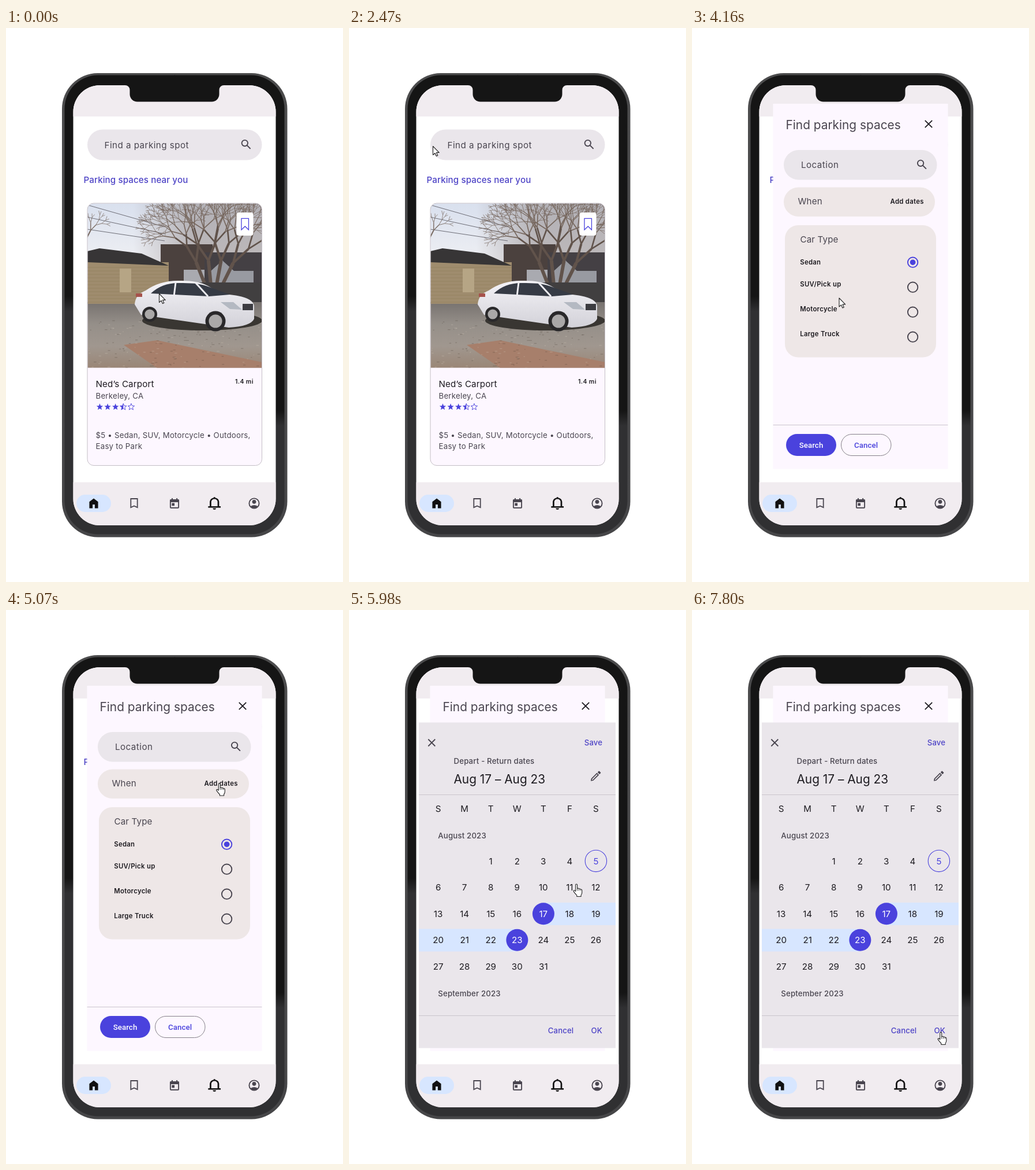
Animation, 584 px wide and 958 px high, one loop 8 s. Source, as an HTML page with a canvas:

```html
<!DOCTYPE html>
<html lang="en">
<head>
<meta charset="utf-8">
<title>Parking finder</title>
<style>
  html, body { margin: 0; width: 100%; height: 100%; overflow: hidden; background: #fff; }
  canvas { display: block; width: 584px; height: 958px; }
</style>
</head>
<body>
<canvas id="stage"></canvas>
<script>
const W = 584, H = 958, LOOP = 8000, FRAME = 130;
const MODAL_AT = 2730, HAND_AT = 5070, CALENDAR_AT = 5200;
const canvas = document.getElementById('stage');
const dpr = window.devicePixelRatio || 1;
canvas.width = W * dpr;
canvas.height = H * dpr;
const ctx = canvas.getContext('2d');

const INK = '#1d1b20', SOFT = '#49454f', PRIMARY = '#4a42dd', LINK = '#4d43c6';
const SURFACE = '#fdf7ff', FIELD = '#eae6eb', WARM = '#eee7e7', BAR = '#f1ecf0';
const RANGE = '#d7e6ff', LINE = '#cac5cc', BEZEL = '#151515', METAL = '#303032';

// The app is drawn a little smaller than its design size
const SCALE = .947;
const BODY = 16 * SCALE, SMALL = 14 * SCALE, LABEL = 12 * SCALE, TITLE = 22 * SCALE;

const ARROW = new Path2D('M.5.5V15.5L4 12.3 6.4 17.6 8.8 16.5 6.5 11.4H11.2Z');
const HAND = new Path2D('M4.3 13V2.2Q4.3.6 5.7.6T7.2 2.2V8.2Q9.4 7 10.2 8.8 12.2 8 12.9 9.7 15.3 9.2 15.3 11.6V15Q15.3 18 13.6 19.6V22H6.4V20Q4 17.6.9 13.4.2 11 2.4 11.4Z');
const HOUSE = new Path2D('M-8 9V-3L0-9 8-3V9H2V2H-2V9Z');
const BELL = new Path2D('M-5 6V-2A5 5 0 0 1 5-2V6M-8 6H8M0-9V-6');
const PENCIL = new Path2D('M-11.5 0L-9-1.8H4.6V1.8H-9Z');

function paint(fill, stroke, lw = 1, path) {
  const args = path ? [path] : [];
  if (fill) { ctx.fillStyle = fill; ctx.fill(...args); }
  if (stroke) { ctx.strokeStyle = stroke; ctx.lineWidth = lw; ctx.stroke(...args); }
}

function box(x, y, w, h, r, fill, stroke, lw) {
  ctx.beginPath();
  ctx.roundRect(x, y, w, h, r);
  paint(fill, stroke, lw);
}

function rect(x, y, w, h, fill) {
  ctx.fillStyle = fill;
  ctx.fillRect(x, y, w, h);
}

function disc(x, y, r, fill, stroke, lw, ry = r) {
  ctx.beginPath();
  ctx.ellipse(x, y, r, ry, 0, 0, 7);
  paint(fill, stroke, lw);
}

function poly(points, fill, stroke, lw) {
  ctx.beginPath();
  for (const [x, y] of points) ctx.lineTo(x, y);
  ctx.closePath();
  paint(fill, stroke, lw);
}

function line(color, lw, x1, y1, x2, y2) {
  ctx.beginPath();
  ctx.moveTo(x1, y1);
  ctx.lineTo(x2, y2);
  paint(null, color, lw);
}

function text(str, x, y, size, { color = INK, weight = 400, gap = 0, align = 'left', face = 'Inter' } = {}) {
  ctx.font = `${weight} ${size}px ${face}, sans-serif`;
  ctx.letterSpacing = gap + 'px';
  ctx.textAlign = align;
  ctx.fillStyle = color;
  ctx.fillText(str, x, y);
}

function at(x, y, drawing, { sx = 1, sy = sx, turn = 0 } = {}) {
  ctx.save();
  ctx.translate(x, y);
  ctx.rotate(turn);
  ctx.scale(sx, sy);
  drawing();
  ctx.restore();
}

function fade(x1, y1, x2, y2, ...colors) {
  const g = ctx.createLinearGradient(x1, y1, x2, y2);
  colors.forEach((c, i) => g.addColorStop(i / (colors.length - 1), c));
  return g;
}

function seeded(seed) {
  return () => (seed = (seed * 16807) % 2147483647) / 2147483647;
}

function cross(x, y, r, color) {
  for (const s of [-r, r]) line(color, 1.8, x - r, y - s, x + r, y + s);
}

function lens(x, y) {
  disc(x - 2.4, y - 2.4, 5.2, null, SOFT, 1.9);
  line(SOFT, 2, x + 1.4, y + 1.4, x + 7.4, y + 7.4);
}

function ribbon(x, y, w, h, dip, color, lw) {
  const r = w / 2, b = h / 2;
  poly([[x - r, y - b], [x + r, y - b], [x + r, y + b], [x, y + b - dip], [x - r, y + b]], null, color, lw);
}

function phone() {
  box(97, 78, 390.5, 802.5, 62, fade(0, 78, 0, 880, '#4c4c4d', '#464648'));
  ctx.save();
  ctx.beginPath();
  ctx.roundRect(101.5, 81.5, 381, 794, 58);
  ctx.clip();
  // The dark glass reaches further down on the right side
  rect(97, 78, 196, 803, fade(0, 464, 0, 490, BEZEL, METAL));
  rect(292, 78, 196, 803, fade(0, 662, 0, 688, BEZEL, METAL));
  ctx.restore();
}

function notch() {
  const l = 214.5, r = 369.5, top = 99, bottom = 127.5;
  ctx.beginPath();
  ctx.moveTo(l - 9, top);
  ctx.arcTo(l, top, l, bottom, 8);
  ctx.arcTo(l, bottom, r, bottom, 13);
  ctx.arcTo(r, bottom, r, top, 13);
  ctx.arcTo(r, top, r + 9, top, 8);
  ctx.lineTo(r + 9, top);
  paint(BEZEL);
}

function nav() {
  const y = 822;
  rect(116, 785.5, 352, 75, BAR);
  box(122, y - 15, 60, 30, 15, RANGE);
  at(152, y, () => paint('#111', null, 0, HOUSE), { sx: SCALE });
  ribbon(222, y - .5, 11.4, 15, 2.6, SOFT, 1.8);

  box(284.9, 816, 14.2, 13.8, 1, null, SOFT, 1.9);
  rect(284.5, 815.5, 15, 4.5, SOFT);
  for (const x of [287, 295.2]) rect(x, 813, 1.9, 3, SOFT);
  rect(287.3, 821.5, 4.7, 4.7, SOFT);

  at(361.2, y - .6, () => {
    paint(null, '#111', 2, BELL);
    ctx.beginPath();
    ctx.arc(0, 8, 2, 0, Math.PI);
    paint('#111');
  }, { sx: 1.36, sy: 1.14 });

  ctx.save();
  disc(430, y, 8.6, null, SOFT, 1.9);
  ctx.clip();
  disc(430, y - 2.7, 3.4, SOFT);
  disc(430, y + 13.5, 10.4, SOFT);
  ctx.restore();
}

function branch(rand, x, y, angle, len, w) {
  const x2 = x + Math.cos(angle) * len, y2 = y + Math.sin(angle) * len;
  line(w > 2 ? '#61534b' : '#77685f', w, x, y, x2, y2);
  if (len < 8) return;
  for (const side of [-1, 1])
    branch(rand, x2, y2, angle + side * (.15 + rand() * .4), len * (.7 + rand() * .16), Math.max(.7, w * .66));
}

function car() {
  disc(340, 506, 104, '#393632', null, 0, 17);
  const shell = new Path2D('M223 478Q224 461 242 454 266 437 298 437 332 436 350 446L374 460Q430 463 430 482V503Q424 516 386 518L234 496Z');
  paint(fade(0, 437, 0, 518, '#f4f3f7', '#d2d1d8'), null, 0, shell);
  const glass = new Path2D('M251 459Q270 441 298 441 334 440 350 447L388 461 352 464Z');
  paint('#363b45', null, 0, glass);
  for (const [x, lean] of [[294, 3], [328, -22]]) line('#edecf1', 3, x, 440, x - lean, 464);
  poly([[372, 474], [394, 474], [409, 487], [388, 486]], '#b4b9c2');
  rect(410, 477, 18, 11, '#3c3c41');
  rect(225, 459, 11, 6, '#a6524c');
  for (const [x, y, r] of [[249, 495, 13], [363, 507, 17.5]]) {
    disc(x, y, r, '#29282a');
    disc(x, y, r * .66, '#aaa8a8');
  }
}

// Flat stand-in for the photograph of a driveway
function photo() {
  const rand = seeded(71);
  ctx.save();
  ctx.beginPath();
  ctx.roundRect(141.5, 303.5, 301.5, 284, [10, 10, 0, 0]);
  ctx.clip();
  rect(141, 303, 303, 170, fade(0, 303, 0, 400, '#d9e0ee', '#eeeff3'));
  rect(220, 303, 224, 130, fade(220, 0, 320, 0, 'rgba(140,130,128,0)', 'rgba(140,130,128,.5)'));
  for (let i = 0; i < 3; i++) line('#6d6d76', 1, 141, 306 + i * 21, 275, 344 + i * 12);

  rect(268, 374, 90, 70, '#4b413e');
  rect(344, 388, 100, 62, '#444044');
  rect(308, 418, 36, 22, '#a9aab0');
  rect(354, 420, 75, 30, '#989aa1');
  poly([[354, 421], [375, 402], [396, 421]], '#989aa1');
  for (let k = 0; k < 4; k++) branch(rand, 345 + k * 10, 444, -1.95 + k * .28, 42, 6);
  branch(rand, 139, 365, -1.1, 17, 2);

  rect(270, 440, 174, 44, '#413f40');
  rect(141, 474, 303, 114, fade(0, 474, 0, 588, '#77726f', '#958f89', '#a0978f', '#9a8676'));
  rect(141, 405, 141, 72, '#9f8c6e');
  for (let y = 414; y < 476; y += 6) line('#94825f', .8, 141, y, 282, y);
  rect(197, 416, 20, 41, '#b6a585');
  poly([[141, 386], [162, 381], [235, 390], [282, 411], [141, 405]], '#373536');
  poly([[204, 548], [262, 540], [444, 578], [444, 588], [262, 588]], '#a77f6b');
  for (let i = 0; i < 170; i++)
    rect(141 + rand() * 302, 505 + rand() * 82, 1 + rand() * 4, 1.2,
      rand() < .5 ? 'rgba(70,58,48,.28)' : 'rgba(215,205,190,.28)');
  car();
  ctx.restore();
}

function star(x, y, fill) {
  const points = Array.from({ length: 10 }, (_, i) => {
    const a = i * Math.PI / 5 - Math.PI / 2, r = i % 2 ? 2.6 : 6;
    return [x + r * Math.cos(a), y + r * Math.sin(a)];
  });
  ctx.save();
  if (fill < 1) {
    poly(points, null, PRIMARY, .9);
    ctx.beginPath();
    ctx.rect(x - 7, y - 7, 14 * fill, 14);
    ctx.clip();
  }
  poly(points, PRIMARY);
  ctx.restore();
}

function home() {
  box(141, 175.5, 302.5, 53, 26.5, FIELD);
  text('Find a parking spot', 170.5, 207.5, BODY, { color: SOFT, gap: .47 });
  lens(416.2, 201.5);
  text('Parking spaces near you', 134.5, 268, BODY, { color: LINK, weight: 500, gap: .1 });
}

function card() {
  box(141, 303, 302.5, 453.5, 11, SURFACE);
  photo();
  box(141, 303, 302.5, 453.5, 11, null, '#c4bfc6');
  box(399.5, 319, 29, 40, 4, '#fff');
  ribbon(414.2, 339.2, 12.5, 19.5, 6, PRIMARY, 1.3);

  text('Ned’s Carport', 155.5, 620.5, BODY, { gap: .14 });
  text('1.4 mi', 397, 614.5, 11 * SCALE, { weight: 600, gap: .4 });
  const note = { color: SOFT, gap: .237 };
  text('Berkeley, CA', 155.5, 640.5, SMALL, note);
  for (let i = 0; i < 5; i++) star(162.5 + i * 13.6, 655.3, Math.max(0, Math.min(1, 3.5 - i)));
  text('$5 • Sedan, SUV, Motorcycle • Outdoors,', 155.5, 709.3, SMALL, note);
  text('Easy to Park', 155.5, 728.3, SMALL, note);
}

function modal() {
  rect(140.5, 131, 303, 631.5, SURFACE);
  text('Find parking spaces', 162.5, 175.3, TITLE, { color: SOFT });
  cross(410, 166, 6.2, INK);

  box(159, 211, 265.5, 51.5, 25.7, FIELD);
  text('Location', 189, 242.3, BODY, { color: SOFT, gap: .47 });
  lens(398.5, 236.2);

  const label = { weight: 600, gap: .3 };
  box(159, 275.5, 262, 50.5, 25.2, WARM);
  text('When', 183.5, 305.3, BODY, { color: SOFT, gap: .2 });
  text('Add dates', 343.5, 304.3, LABEL, label);

  box(161, 341, 262, 228.5, 23, WARM);
  text('Car Type', 187.5, 371, BODY, { color: SOFT, gap: .14 });
  ['Sedan', 'SUV/Pick up', 'Motorcycle', 'Large Truck'].forEach((name, i) => {
    const y = 405.2 + i * 43, chosen = i === 0;
    text(name, 187.2, y + (chosen ? 4 : -1.5), LABEL, label);
    disc(382.6, y, 8.7, null, chosen ? PRIMARY : SOFT, 1.9);
    if (chosen) disc(382.6, y, 4.8, PRIMARY);
  });

  line(LINE, 1, 140.5, 686.5, 443.5, 686.5);
  const button = { weight: 500, gap: .1, align: 'center', face: 'Roboto' };
  box(163, 702, 87, 38, 19, PRIMARY);
  text('Search', 206.5, 725.5, SMALL, { ...button, color: '#fff' });
  box(258.5, 702.5, 86.5, 37, 18.5, null, '#858088');
  text('Cancel', 301.5, 725.5, SMALL, { ...button, color: PRIMARY });
}

function calendar(t) {
  const col = i => 154.6 + i * 45.55, row = i => 434.3 + i * 45.5;
  const action = { color: LINK, weight: 500, gap: .1, align: 'center' };
  const caption = { color: SOFT, weight: 500, gap: .15 };
  rect(121, 194.5, 341, 563, FIELD);
  cross(143.3, 229.5, 6, SOFT);
  text('Save', 423.5, 234.3, SMALL, action);
  text('Depart - Return dates', 181.5, 266.3, SMALL, caption);
  text('Aug 17 – Aug 23', 181.5, 300, TITLE);
  at(427.7, 287, () => {
    paint(null, SOFT, 1.8, PENCIL);
    box(7, -2.6, 3.9, 5.2, 1, SOFT);
  }, { sx: SCALE, turn: -Math.PI / 4 });
  line(LINE, 1, 121, 319.5, 462, 319.5);
  [...'SMTWTFS'].forEach((d, i) => text(d, col(i), 348.5, BODY, { align: 'center' }));
  text('August 2023', 154.3, 395.4, SMALL, caption);

  rect(col(4), 506, 462 - col(4), 39, RANGE);
  rect(121, 551.5, col(3) - 121, 39, RANGE);
  for (let day = 1; day <= 31; day++) {
    const x = col((day + 1) % 7), y = row(Math.floor((day + 1) / 7));
    const picked = day === 17 || day === 23, today = day === 5;
    if (picked) disc(x + .1, y, 19, PRIMARY);
    if (today) disc(x, y - .4, 18.7, null, PRIMARY, 1.1);
    text(day, x, y + 5.6, BODY, { align: 'center', color: picked ? '#fff' : today ? PRIMARY : INK });
  }
  text('September 2023', 154.3, 668.4, SMALL, caption);

  // The footer cuts off the next month's first row; only its hover state peeks out
  if (t >= 6370 && t < 6630) {
    ctx.save();
    ctx.beginPath();
    ctx.rect(400, 680, 60, 21);
    ctx.clip();
    disc(428, row(6), 19, '#dcd7dd');
    ctx.restore();
  }
  line(LINE, 1, 121, 701.5, 462, 701.5);
  text('Cancel', 367, 732.4, SMALL, action);
  text('OK', 429.3, 732.4, SMALL, action);
}

// Each move ends at x, y; bow bends its path downwards, step is its frame length
const MOVES = [
  { start: 910, end: 1430, x: 145, y: 204, bow: 0, step: 520 },
  { start: 2990, end: HAND_AT, x: 364, y: 299, bow: 215, step: 520 },
  { start: 5590, end: 6500, x: 421, y: 706, bow: 0, step: FRAME },
  { start: 6500, end: 7150, x: 425.5, y: 729.5, bow: 0, step: FRAME }
];

function pointerAt(t) {
  let x = 265, y = 459;
  for (const m of MOVES) {
    const passed = Math.floor((t - m.start) / m.step) * m.step;
    const u = Math.max(0, Math.min(1, passed / (m.end - m.start)));
    x += (m.x - x) * u;
    y += (m.y - y) * u + m.bow * Math.sin(Math.PI * u);
  }
  return [x, y];
}

function pointer(t) {
  const hand = t >= HAND_AT;
  at(...pointerAt(t), () => {
    ctx.lineJoin = 'round';
    paint('#fff', '#222', 1.1, hand ? HAND : ARROW);
    if (hand) for (let i = 0; i < 3; i++) line('#222', .9, 7.2 + i * 2.9, 8.2 + i * .7, 7.2 + i * 2.9, 12);
  });
}

function draw(t) {
  ctx.setTransform(dpr, 0, 0, dpr, 0, 0);
  rect(0, 0, W, H, '#fff');
  phone();
  ctx.save();
  ctx.beginPath();
  ctx.roundRect(116.5, 99, 351, 761, 46);
  ctx.clip();
  rect(116, 98, 353, 763, '#fff');
  rect(116, 98, 353, 55, BAR);
  home();
  if (t < MODAL_AT) card(); else modal();
  if (t >= CALENDAR_AT) calendar(t);
  nav();
  notch();
  ctx.restore();
  pointer(t);
}

const start = performance.now();
function tick() {
  draw((performance.now() - start) % LOOP);
  requestAnimationFrame(tick);
}
tick();
</script>
</body>
</html>
```
